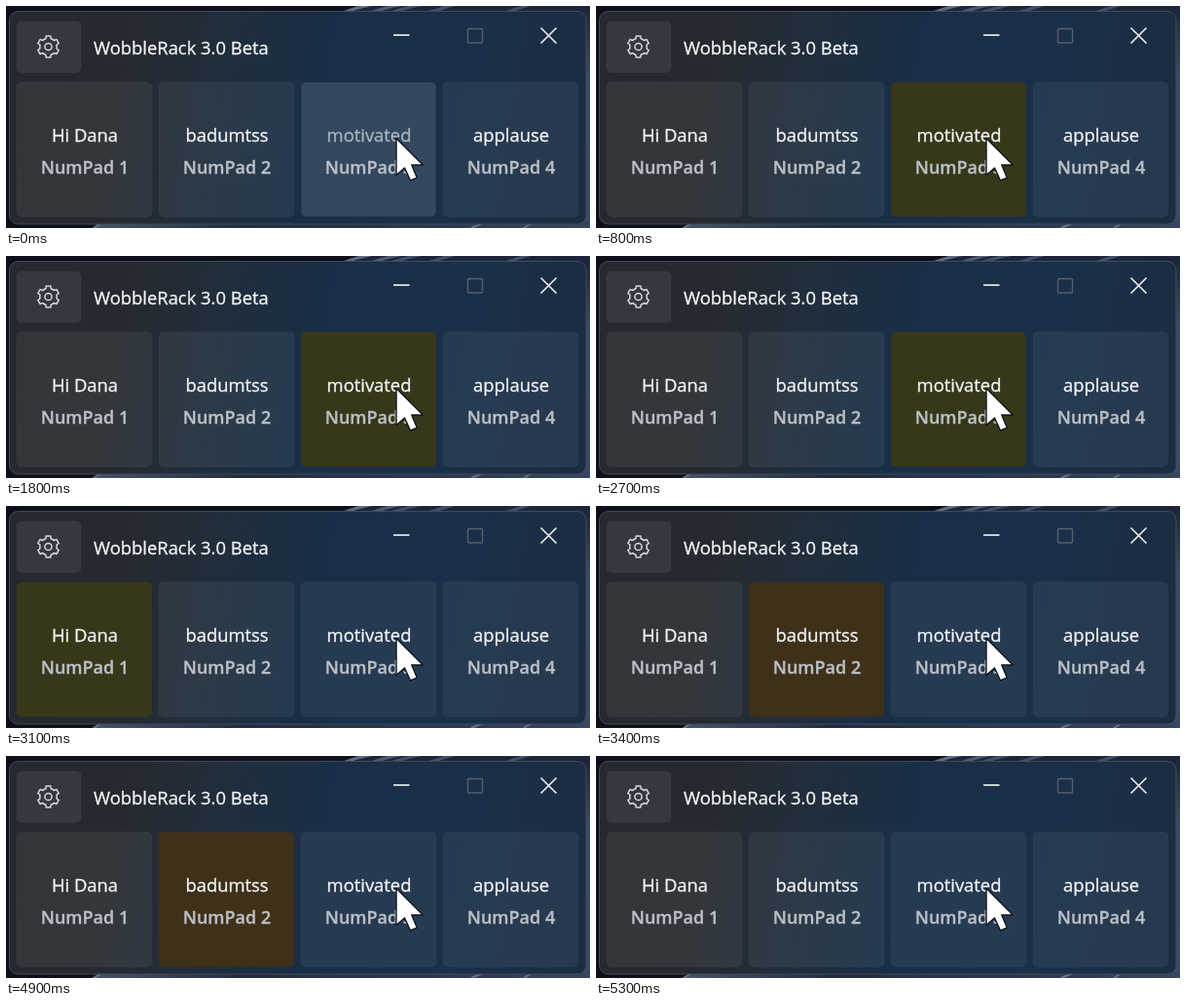
An HTML page for the animation above (5.6 s loop, 600 by 229 pixels).

```html
<!DOCTYPE html>
<html lang="en">
<head>
<meta charset="utf-8">
<title>Sound pad</title>
<style>
  html, body { margin: 0; width: 100%; height: 100%; overflow: hidden; background: #0d0f1a; }
  svg { display: block; width: 100vw; height: 100vh; }
  text { font: 18.4px "Open Sans", "Noto Sans", sans-serif; fill: #f4f5f6; stroke: #f4f5f6; stroke-width: .3px; }
  .key { font-size: 18px; font-weight: 600; fill: #bbc0c6; stroke: #bbc0c6; }
  .mid { text-anchor: middle; }
  .held { fill: #a9b4bd; stroke: #a9b4bd; }
</style>
</head>
<body>
<svg viewBox="0 0 600 229" preserveAspectRatio="none">
  <defs>
    <linearGradient id="glass" x1="0" y1="0" x2="1" y2="0.06">
      <stop offset="0" stop-color="#26292f"/>
      <stop offset="0.22" stop-color="#262a30"/>
      <stop offset="0.38" stop-color="#202e3c"/>
      <stop offset="0.56" stop-color="#192e47"/>
      <stop offset="0.8" stop-color="#1a2f48"/>
      <stop offset="1" stop-color="#1b2d43"/>
    </linearGradient>
    <linearGradient id="floor" x1="0" y1="0" x2="1" y2="0">
      <stop offset="0" stop-color="#46546b"/>
      <stop offset="0.3" stop-color="#222c40"/>
      <stop offset="0.7" stop-color="#2a3850"/>
      <stop offset="1" stop-color="#36465e"/>
    </linearGradient>
    <linearGradient id="side" x1="0" y1="0" x2="0" y2="1">
      <stop offset="0" stop-color="#1c263b"/>
      <stop offset="0.3" stop-color="#3d4c63"/>
      <stop offset="1" stop-color="#3a4a62"/>
    </linearGradient>
  </defs>

  <!-- wallpaper -->
  <rect width="600" height="229" fill="#0d0f1a"/>
  <path d="M340 8Q356 1 366 0H600V8Z" fill="#1b263b"/>
  <rect x="585" y="4" width="15" height="225" fill="url(#side)"/>
  <g fill="none" stroke="#5d6b83" stroke-width="3.2">
    <path d="M344 8Q361 1 378 -2"/>
    <path d="M372 8Q388 2 408 -2" stroke="#4d5b74"/>
    <path d="M392 8Q410 2 428 -2" stroke="#41506a"/>
    <path d="M430 8Q446 3 462 -2" stroke="#41506a"/>
    <path d="M510 8Q524 3 540 -2" stroke="#41506a"/>
  </g>
  <path d="M88 229L100 222H600V229Z" fill="url(#floor)"/>
  <path d="M90 229L98 224M478 229L490 224M532 229L540 224" stroke="#66758c" stroke-width="2"/>

  <!-- window -->
  <rect x="3.5" y="5.5" width="592.5" height="219.5" rx="9" fill="url(#glass)" stroke="#424a57"/>
  <rect x="11" y="16" width="66" height="52.5" rx="5" fill="#fff" fill-opacity=".07" stroke="#fff" stroke-opacity=".035"/>
  <g fill="none" stroke="#d5d8dc" stroke-width="1.5" stroke-linejoin="round">
    <path id="gear"/>
    <circle cx="43.5" cy="42" r="3.6"/>
  </g>
  <text x="90" y="50">WobbleRack 3.0 Beta</text>
  <g fill="none" stroke="#e9ebee" stroke-width="1.7">
    <path d="M398 30H414.5"/>
    <rect x="474.5" y="23.5" width="15" height="14.5" rx="1" stroke="#56606c" stroke-width="1.4"/>
    <path d="M549.5 22.5L565.5 38.5M565.5 22.5L549.5 38.5"/>
  </g>

  <g id="pads"></g>

  <path d="M401 136.5V174.5L409.5 167L415.5 180L422.3 177.2L416.8 164H428.3Z"
        fill="#fff" stroke="#10151c" stroke-width="1.4" stroke-linejoin="round"/>
</svg>
<script>
const LOOP = 5600, PITCH = 146, PRESS_END = 700;
const OLIVE = "#37381a", AMBER = "#3f3019";

const labels = ["Hi Dana", "badumtss", "motivated", "applause"];
// pad index, start, end, fill
const lit = [
  [2, 800, 2800, OLIVE],
  [0, 2800, 3400, OLIVE],
  [1, 3400, 5100, AMBER]
];

// fill, fill opacity, stroke, stroke opacity
const IDLE = ["#e8fbff", .06, "#fff", .03];
const HELD = ["#e4ffff", .125, "#1c3147", .7];

function add(parent, tag, attrs, text) {
  const el = document.createElementNS("http://www.w3.org/2000/svg", tag);
  for (const k in attrs) el.setAttribute(k, attrs[k]);
  if (text) el.textContent = text;
  return parent.appendChild(el);
}

function gearPath(cx, cy, teeth) {
  const step = 2 * Math.PI / teeth, points = [];
  for (let i = 0; i < teeth; i++) {
    for (const [off, r] of [[-.28, 8.9], [-.2, 11.3], [.2, 11.3], [.28, 8.9]]) {
      const a = (i + off + .5) * step;
      points.push((cx + r * Math.cos(a)).toFixed(2) + " " + (cy + r * Math.sin(a)).toFixed(2));
    }
  }
  return "M" + points.join("L") + "Z";
}

document.getElementById("gear").setAttribute("d", gearPath(43.5, 42, 6));

const root = document.getElementById("pads");
const pads = labels.map((label, i) => {
  const x = 11 + i * PITCH, cx = x + 70;
  const box = add(root, "rect", { x, y: 78.5, width: 139, height: 139, rx: 5 });
  const name = add(root, "text", { x: cx, y: 140, class: "mid" }, label);
  add(root, "text", { x: cx, y: 173, class: "mid key" }, "NumPad " + (i + 1));
  return { box, name };
});

function paint(box, [fill, alpha, stroke, edge]) {
  box.setAttribute("fill", fill);
  box.setAttribute("fill-opacity", alpha);
  box.setAttribute("stroke", stroke);
  box.setAttribute("stroke-opacity", edge);
}

function draw(t) {
  pads.forEach(({ box, name }, i) => {
    const on = lit.find(([pad, from, to]) => pad === i && t >= from && t < to);
    const held = i === 2 && t < PRESS_END;
    paint(box, on ? [on[3], 1, "none", 0] : held ? HELD : IDLE);
    name.classList.toggle("held", held);
  });
}

const start = performance.now();
function tick(now) {
  draw(Math.max(0, now - start) % LOOP);
  requestAnimationFrame(tick);
}
draw(0);
requestAnimationFrame(tick);
</script>
</body>
</html>
```
